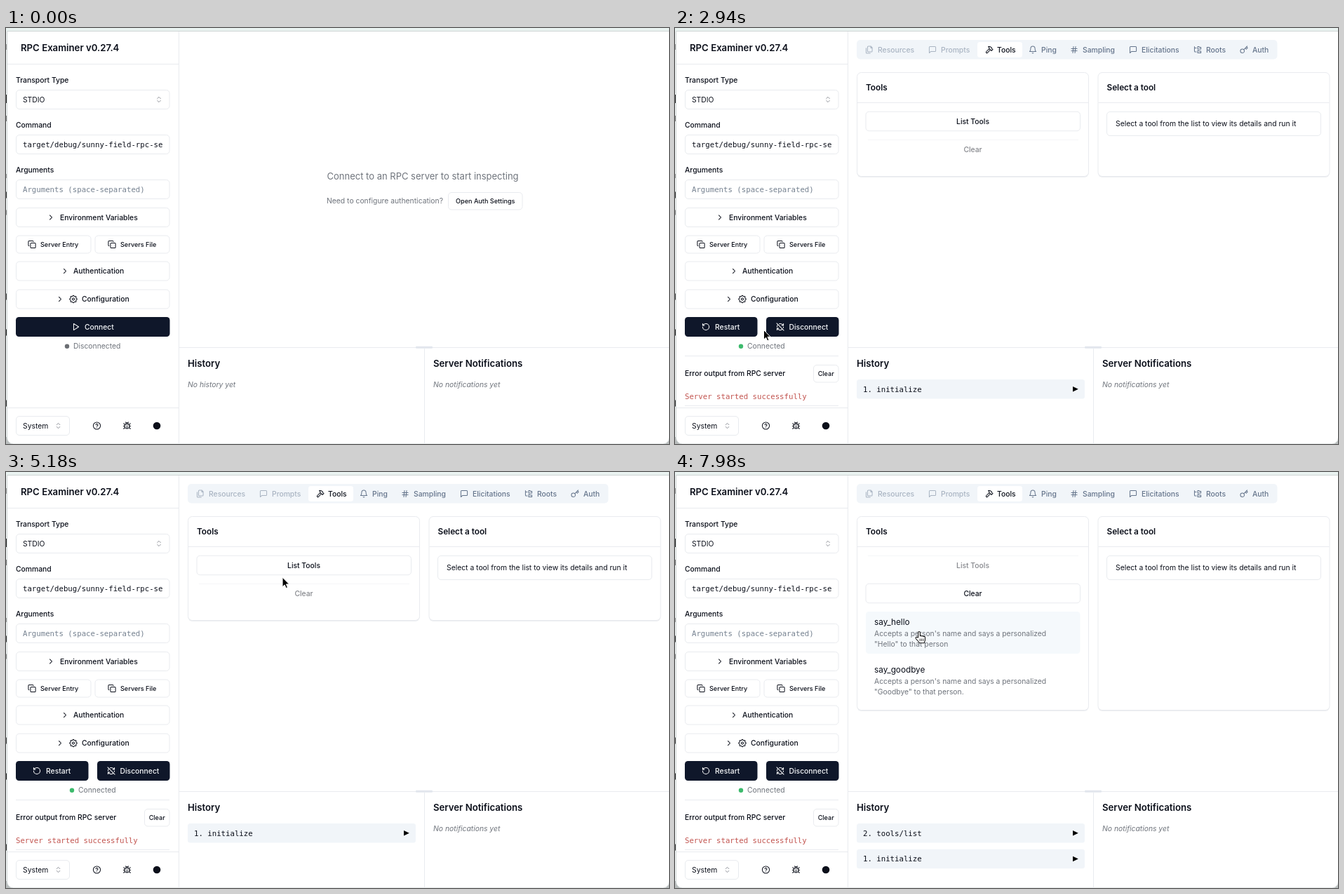
Animation, 945 px wide and 593 px high, one loop 8 s. Source, as an HTML page:

```html
<!DOCTYPE html>
<html lang="en">
<head>
<meta charset="utf-8">
<title>Server inspector</title>
<style>
  html, body { margin: 0; width: 100%; height: 100%; overflow: hidden; background: #fff; }
  svg { display: block; width: 100%; height: 100%; }
  text { font-family: Inter, "Liberation Sans", sans-serif; white-space: pre; }
  .mono { font-family: "DejaVu Sans Mono", monospace; }
  .icon { fill: none; stroke-width: 2; stroke-linecap: round; stroke-linejoin: round; }
</style>
</head>
<body>
<svg id="stage" viewBox="0 0 945 593" xmlns="http://www.w3.org/2000/svg"></svg>
<script>
const LOOP = 8000, STEP = 70;
const CONNECTED = 2800, LISTED = 6300;
const INK = '#0b0f1a', NAVY = '#0f172a', MUTED = '#6f747c', SLATE = '#64748b';
const LINE = '#e9ebef', FAINT = '#f5f6f8', PALE = '#f1f5f9';
const SMALL = 9.1, BODY = 10.35, LARGE = 11.75, TITLE = 13.2;

// y is the vertical centre of the capitals
function text(x, y, string, { size = BODY, weight = 400, fill = INK, anchor = 'start', extra = '' } = {}) {
  return `<text x="${x}" y="${y + size * 0.363}" font-size="${size}" font-weight="${weight}"
    fill="${fill}" text-anchor="${anchor}" ${extra}>${string}</text>`;
}
const label = (x, y, string, fill = INK) => text(x, y, string, { weight: 500, fill });
const title = (x, y, string, size = TITLE) => text(x, y, string, { size, weight: 600 });
const mono = (x, y, string, fill = INK) => text(x, y, string, { size: 10.7, fill, extra: 'class="mono"' });
const italic = (x, y, string) => text(x, y, string, { fill: MUTED, extra: 'font-style="italic"' });
const centred = (x, y, string, options) => text(x, y, string, { weight: 500, anchor: 'middle', ...options });

function box(x, y, w, h, { fill = '#fff', stroke = LINE, rx = 4.5, extra = '' } = {}) {
  return `<rect x="${x}" y="${y}" width="${w}" height="${h}" rx="${rx}" fill="${fill}" stroke="${stroke}" ${extra}/>`;
}
const button = (x, y, w, h, fill = '#fff', hover = PALE, stroke = LINE) =>
  box(x, y, w, h, { fill, stroke, extra: `data-fill="${fill}" data-hover="${hover}"` });
const darkButton = (x, w) => button(x, 412, w, 28, NAVY, '#272e3f', 'none');
const rule = (x1, y1, x2, y2, stroke = LINE) => `<path d="M${x1} ${y1}L${x2} ${y2}" stroke="${stroke}"/>`;
const dot = (x, y, r, fill) => `<circle cx="${x}" cy="${y}" r="${r}" fill="${fill}"/>`;

// Icons are drawn in a 24-unit square centred on x, y
function icon(x, y, d, stroke = INK, size = 12.2) {
  const scale = size / 24;
  return `<path class="icon" d="${d}" stroke="${stroke}"
    transform="translate(${x - size / 2} ${y - size / 2}) scale(${scale})"/>`;
}
const ring = (cx, cy, r) => `M${cx - r} ${cy}a${r} ${r} 0 1 0 ${2 * r} 0a${r} ${r} 0 1 0 ${-2 * r} 0`;
function gear() {
  const points = Array.from({ length: 64 }, (_, i) => {
    const a = i * Math.PI / 32, r = 9.2 + 1.2 * Math.cos(8 * a);
    return `${(12 + r * Math.sin(a)).toFixed(1)} ${(12 - r * Math.cos(a)).toFixed(1)}`;
  });
  return `M${points.join('L')}Z${ring(12, 12, 3)}`;
}
const CHEVRON = 'm9 18 6-6-6-6';
const UP_DOWN = 'm7 15 5 5 5-5M7 9l5-5 5 5';
const COPY = 'M10 8h10a2 2 0 0 1 2 2v10a2 2 0 0 1-2 2H10a2 2 0 0 1-2-2V10a2 2 0 0 1 2-2zM4 16a2 2 0 0 1-2-2V4a2 2 0 0 1 2-2h10a2 2 0 0 1 2 2';
const SPEECH = 'M21 15a2 2 0 0 1-2 2H7l-4 4V5a2 2 0 0 1 2-2h14a2 2 0 0 1 2 2z';
const HELP = ring(12, 12, 10) + 'M9.1 9a3 3 0 0 1 5.8 1c0 2-3 3-3 3M12 17h.01';
const BUG = 'm8 2 2 2M14 4l2-2M9 7V6a3 3 0 0 1 6 0v1M12 20a6 6 0 0 1-6-6v-3a4 4 0 0 1 4-4h4a4 4 0 0 1 4 4v3a6 6 0 0 1-6 6v-9' +
  'M6.5 9Q3 8.5 3 5M6 13H2M3 21q0-4 4-4M17.5 9Q21 8.5 21 5M22 13h-4M17 17q4 0 4 4';

const phase = (from, to, ...parts) => `<g data-from="${from}" data-to="${to}">${parts.join('')}</g>`;

function backdrop() {
  const marks = [[27, 8, '#999'], [101, 12, '#222'], [129, 8, '#777'], [211, 6, '#999'], [238, 9, '#333'],
    [263, 7, '#888'], [383, 9, '#444'], [434, 9, '#222'], [535, 9, '#333']];
  return `<path d="M0 0H945V593H0Z" fill="#f3f6f6"/><path d="M0 583H945V593H0Z" fill="#b9bdbd"/>
    <path d="M0 0H945V4H0Z" fill="#eaf3f1"/>
    ${marks.map(([y, h, fill]) => `<rect y="${y - h / 2}" width="1.4" height="${h}" fill="${fill}"/>`).join('')}
    <path d="M1.5 4.5H945.5V584a9 9 0 0 1-9 9H10a9 9 0 0 1-8.5-9Z" fill="#fff" stroke="#cfd5d5"/>`;
}

function sidebar() {
  const field = y => box(14.5, y - 13.5, 218.5, 27);
  const wide = y => button(14.5, y - 13.5, 218.5, 27);
  const small = (x, string) => text(x, 308.5, string, { size: SMALL, weight: 500 });
  return [
    rule(246.5, 5, 246.5, 593), rule(2, 51.5, 246, 51.5), rule(2, 541.5, 246, 541.5),
    title(21, 28, 'RPC Examiner v0.27.4'),
    label(14, 74, 'Transport Type'), field(102), text(24, 102, 'STDIO'), icon(218, 102, UP_DOWN, '#858890', 11),
    label(14, 138, 'Command'), field(166), mono(24, 166, 'target/debug/sunny-field-rpc-se'),
    label(14, 202, 'Arguments'), field(230), mono(24, 230, 'Arguments (space-separated)', '#74808f'),
    wide(270), icon(64, 270, CHEVRON), label(77, 270, 'Environment Variables'),
    button(14.5, 296, 106.5, 25), icon(37, 308.5, COPY), small(49, 'Server Entry'),
    button(127, 296, 106, 25), icon(151, 308.5, COPY), small(163, 'Servers File'),
    wide(346.5), icon(84, 346.5, CHEVRON), label(96, 346.5, 'Authentication'),
    wide(386.5), icon(77, 386.5, CHEVRON), icon(96, 386.5, gear()), label(108, 386.5, 'Configuration'),
    box(14.5, 553.5, 76, 27), text(24, 567, 'System'), icon(74.5, 567, UP_DOWN, '#858890', 11),
    icon(129.5, 567, HELP), icon(172.5, 567, BUG), dot(215, 567, 5.3, INK),
  ].join('');
}

function lowerPanes() {
  return rule(247, 455.5, 945, 455.5) + rule(596.5, 457, 596.5, 593) +
    box(584, 453.7, 24, 3, { fill: '#e2e6ed', stroke: 'none', rx: 1 }) +
    title(259, 478, 'History') + title(609, 478, 'Server Notifications') +
    italic(609, 508.5, 'No notifications yet');
}

function idleView() {
  return phase(0, CONNECTED,
    darkButton(14, 219.5), icon(99.5, 426, 'M6 3l14 9-14 9z', '#fff'), label(112, 426, 'Connect', '#f8fafc'),
    dot(87, 453.7, 3.2, '#6b6e73'), text(96, 453.7, 'Disconnected', { fill: MUTED }),
    text(457.5, 211.5, 'Connect to an RPC server to start inspecting', { size: 13, fill: MUTED }),
    text(457, 246.5, 'Need to configure authentication?', { fill: MUTED }),
    button(630.5, 234.5, 105.5, 24.5), centred(683.3, 247, 'Open Auth Settings', { size: SMALL }),
    italic(259, 508.5, 'No history yet'));
}

function tabs() {
  const tab = (iconX, textX, string, d, fill = SLATE) => icon(iconX, 31, d, fill) + label(textX, 31, string, fill);
  const faded = '#a9b4c2';
  return box(259, 17, 599.5, 27.5, { fill: PALE, stroke: 'none', rx: 5 }) +
    box(431, 20, 64, 22, { stroke: 'none', rx: 3.5 }) +
    tab(277, 289, 'Resources', 'M16 2v5h4M9 18a2 2 0 0 1-2-2V4a2 2 0 0 1 2-2h7l4 4v10a2 2 0 0 1-2 2zM3 7.6v12.8a1.6 1.6 0 0 0 1.6 1.6h9.8', faded) +
    tab(367, 379, 'Prompts', SPEECH, faded) +
    tab(448, 459, 'Tools', 'm15 12-8.4 8.4a2 2 0 0 1-3-3L12 9M18 15l4-4M21.5 11.5 19 9V7l-2.3-2.3a6 6 0 0 0-4.2-1.7H9l1 1q2 2 2 4.4V10l2 2h1.2l3.3 2.5', INK) +
    tab(510, 522, 'Ping', 'M6 8a6 6 0 0 1 12 0c0 7 3 9 3 9H3s3-2 3-9M10.3 21a2 2 0 0 0 3.4 0') +
    tab(569, 581, 'Sampling', 'M4 9h16M4 15h16M10 3 8 21M16 3l-2 18') +
    tab(653, 665, 'Elicitations', SPEECH) +
    tab(745, 757, 'Roots', 'M12 3h3l2 2h4v5h-9zM12 14h3l1 2h5v5h-9zM3 3v13a2 2 0 0 0 2 2h3M3 5a2 2 0 0 0 2 2h3') +
    tab(811, 823, 'Auth', ring(7.5, 15.5, 5.5) + 'M11.4 11.6 21 2M15.5 7.5l3 3L22 7l-3-3');
}

function liveView() {
  return phase(CONNECTED, LOOP,
    darkButton(14, 103.5), icon(44, 426, 'M3 12a9 9 0 1 0 9-9 9.8 9.8 0 0 0-6.7 2.7L3 8M3 3v5h5', '#fff'),
    label(57, 426, 'Restart', '#f8fafc'),
    darkButton(130, 103.5),
    icon(150, 426, 'M21 8l-2.3-2.3A9.8 9.8 0 0 0 9.1 3.5M21 3v5h-5M3 12a9 9 0 0 1 2.6-6.4M8 16H3v5M3 16l2.3 2.3a9.8 9.8 0 0 0 13 0M21 12l-.5 2.9M22 22 2 2', '#fff'),
    label(162.5, 426, 'Disconnect', '#f8fafc'),
    dot(94, 453.7, 3.2, '#3dba6c'), text(103, 453.7, 'Connected', { fill: MUTED }),
    rule(14, 467.5, 233, 467.5), rule(14, 538.5, 233, 538.5),
    label(14, 492.5, 'Error output from RPC server'),
    button(197.5, 480.5, 35.5, 24.5), centred(215.2, 492.7, 'Clear', { size: SMALL }),
    mono(14, 524.7, 'Server started successfully', '#c2544f'),
    tabs());
}

function card(x, height, heading) {
  return box(x + 0.5, 65, 330, height, { fill: '#eceef1', stroke: 'none', rx: 6 }) +
    box(x + 0.5, 63.5, 330, height, { rx: 6 }) + rule(x + 1, 106.5, x + 330, 106.5) +
    title(x + 13, 85, heading, LARGE);
}
function cards(height) {
  return card(259, height, 'Tools') + card(602.5, height, 'Select a tool') +
    box(615.5, 119.5, 305, 34) + text(628, 136.5, 'Select a tool from the list to view its details and run it');
}
function historyRow(y, string) {
  return box(259, y - 13.7, 325, 27.4, { fill: PALE, stroke: 'none', rx: 3.5 }) + mono(268, y, string) +
    `<path d="M567 ${y - 3.7}l7.8 3.7-7.8 3.7z" fill="#000"/>`;
}
function tool(y, name, ...lines) {
  return button(272, y, 305.5, 60, '#fff', '#f5f9fc', 'none') + text(284, y + 15.2, name, { size: LARGE }) +
    lines.map((line, i) => text(284, y + 31.4 + i * 15.3, line, { fill: MUTED })).join('');
}
const listButton = (y, string) => button(272, y - 13.7, 305.5, 27.4) + centred(424.5, y, string);
const disabledButton = (y, string) =>
  rule(275, y - 13.5, 575, y - 13.5, FAINT) + centred(424.5, y, string, { fill: '#85878c' });

function toolViews() {
  return phase(CONNECTED, LISTED, cards(148), listButton(133, 'List Tools'), disabledButton(173, 'Clear'),
      historyRow(514.7, '1. initialize')) +
    phase(LISTED, LOOP, cards(276), disabledButton(133, 'List Tools'), listButton(173, 'Clear'),
      tool(199, 'say_hello', "Accepts a person's name and says a personalized", '"Hello" to that person'),
      tool(266.7, 'say_goodbye', "Accepts a person's name and says a personalized", '"Goodbye" to that person.'),
      historyRow(514.7, '2. tools/list'), historyRow(551.5, '1. initialize'));
}

const pointer = `<g id="pointer">
  <circle id="ripple" r="29.3" fill="none" stroke="#111" stroke-width="1.5"/>
  <path id="arrow" d="M0 0V13.6L3.1 10.7 5.2 15.4 7.4 14.4 5.4 9.8H9.6Z" fill="#000" stroke="#fff" stroke-width="1"/>
  <g id="hand" transform="scale(1.06)" stroke="#111" stroke-width="1" stroke-linejoin="round">
    <path fill="#fff" d="M-1.3 8V1.3a1.3 1.3 0 0 1 2.6 0V6c.2-1 2.3-.9 2.4.4c.4-.9 2.3-.7 2.3.5c.5-.7 2-.4 2 .8V11c0 2.3-1 2.7-1.3 4.4H.5c-.5-1.5-3.5-3.9-4.9-6c-1-1.6.9-2.8 2-1.6z"/>
    <path d="M1.2 9.5v3.2M3.4 9.5v3.2M5.6 9.5v3.2" fill="none" stroke-width=".8"/>
  </g></g>`;

const stage = document.getElementById('stage');
stage.innerHTML = backdrop() + sidebar() + lowerPanes() + idleView() + liveView() + toolViews() + pointer;

const [pointerEl, ripple, arrow, hand] = ['pointer', 'ripple', 'arrow', 'hand'].map(id => document.getElementById(id));
const phases = [...stage.querySelectorAll('[data-from]')];
const targets = [...stage.querySelectorAll('[data-hover]')];

// Pointer stops: time, x, y
const stops = [
  [910, 509, 77], [1050, 309, 300], [1120, 309, 300], [1820, 130, 427], [1890, 130, 427], [1960, 128.5, 428],
  [2030, 128.5, 428], [2170, 126.5, 430.5], [3710, 126.5, 430.5], [4480, 341, 174.5], [4690, 341, 174.5],
  [5530, 426, 135.5], [7070, 426, 135.5], [7980, 348, 227.5],
];
const clicks = [[2590, CONNECTED], [6020, LISTED]];

function pointerAt(time) {
  const next = stops.findIndex(stop => stop[0] > time);
  if (next < 1) return (next ? stops.at(-1) : stops[0]).slice(1);
  const [t0, x0, y0] = stops[next - 1], [t1, x1, y1] = stops[next];
  const u = (time - t0) / (t1 - t0), ease = u * u * (3 - 2 * u);
  return [x0 + (x1 - x0) * ease, y0 + (y1 - y0) * ease];
}
const show = (element, visible) => element.setAttribute('display', visible ? 'inline' : 'none');

function render(now) {
  const time = Math.floor(now % LOOP / STEP) * STEP;
  const within = ([from, to]) => time >= from && time < to;
  const [x, y] = pointerAt(time), present = time >= stops[0][0];

  for (const group of phases) show(group, within([+group.dataset.from, +group.dataset.to]));
  let hovering = false;
  for (const target of targets) {
    const { x: left, y: top, width, height } = target;
    const dx = x - left.baseVal.value, dy = y - top.baseVal.value;
    const over = present && target.parentNode.getAttribute('display') !== 'none' &&
      dx >= 0 && dx <= width.baseVal.value && dy >= 0 && dy <= height.baseVal.value;
    target.setAttribute('fill', over ? target.dataset.hover : target.dataset.fill);
    hovering ||= over;
  }
  show(pointerEl, present);
  pointerEl.setAttribute('transform', `translate(${x} ${y})`);
  show(hand, hovering);
  show(arrow, !hovering);
  show(ripple, clicks.some(within));
}

const start = performance.now();
function tick() {
  render(performance.now() - start);
  requestAnimationFrame(tick);
}
tick();
</script>
</body>
</html>
```
